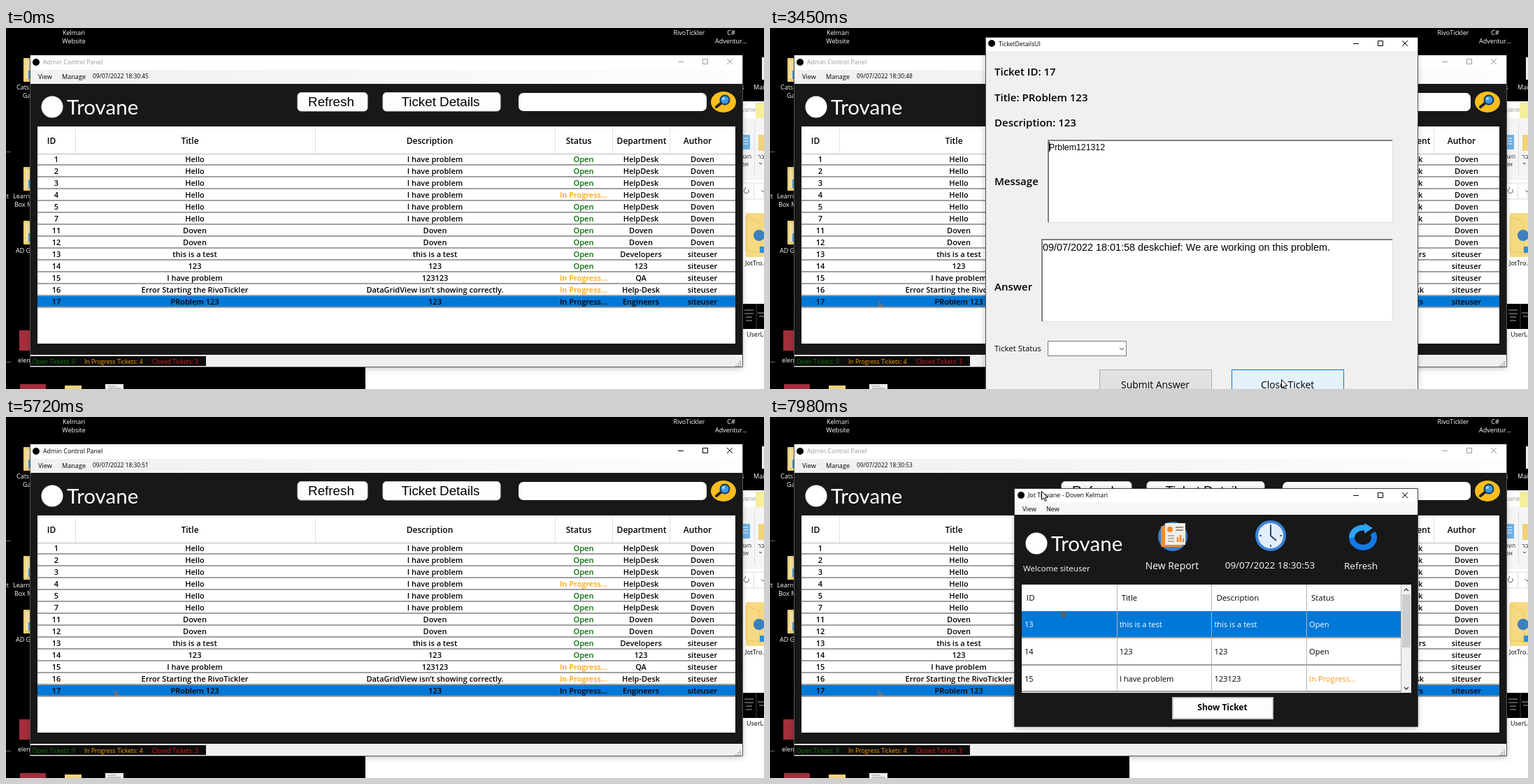
Recreate the animation shown at these times as an HTML page. Size 1084 by 517 pixels, loop 8 s.

```html
<!DOCTYPE html>
<html lang="en">
<head>
<meta charset="utf-8">
<title>Ticket desk</title>
<style>
html, body { margin: 0; width: 100%; height: 100%; overflow: hidden; background: #000; }
svg { display: block; font-family: "Open Sans", "Noto Sans", sans-serif; }
.arial { font-family: "Liberation Sans", Arial, sans-serif; }
.logo { font-family: Lato, sans-serif; }
.medium { font-weight: 500; }
.semi { font-weight: 600; }
.bold { font-weight: 700; }
.mid { text-anchor: middle; }
.frame { filter: drop-shadow(0 2px 4px rgba(0, 0, 0, .28)); }
.pop { transform-box: fill-box; transform-origin: center; }
</style>
</head>
<body>
<svg id="stage" width="1084" height="517" viewBox="0 0 1084 517"></svg>
<script>
const DARK = '#181818', BLUE = '#0078d7', ORANGE = '#ffa500', GREEN = '#006e00';
const text = (s, x, y, size, fill = '#000', cls = '', more = '') =>
  `<text x="${x}" y="${y}" font-size="${size}" fill="${fill}" class="${cls}" ${more}>${s}</text>`;
const rect = (x, y, x2, y2, fill, more = '') =>
  `<rect x="${x}" y="${y}" width="${x2 - x}" height="${y2 - y}" fill="${fill}" ${more}/>`;
const disc = (x, y, r, fill, more = '') => `<circle cx="${x}" cy="${y}" r="${r}" fill="${fill}" ${more}/>`;
const line = (d, stroke, width = 1, more = '') =>
  `<path d="${d}" fill="none" stroke="${stroke}" stroke-width="${width}" ${more}/>`;
const controls = (x, y, color) => line(
  `M${x} ${y + .5}h8M${x + 35.5} ${y - 3.5}h7v7h-7zM${x + 70} ${y - 4}l8 8m0-8l-8 8`, color);
const logo = (x, y) => disc(x, y, 15.5, '#fff') + text('Trovane', x + 21, y + 11, 29.5, '#fff', 'logo');

function desktop() {
  const label = (s, x, y) => text(s, x, y, 9, '#fff', 'mid');
  const left = (s, x, y) => text(s, x, y, 9, '#fff');
  const folder = (x, y) => rect(x, y, x + 24, y + 34, '#f3d278', 'rx="1"')
    + rect(x + 3, y + 3, x + 9, y + 30, '#f9e6ac') + rect(x + 7, y + 18, x + 12, y + 30, '#4a9ed6');
  return rect(0, 0, 1084, 517, '#000')
    + label('Kelmari', 97, 10) + label('Website', 97, 22)
    + label('RivoTickler', 977, 10) + label('C#', 1037, 10) + label('Adventur...', 1037, 22)
    + folder(25, 43) + folder(25, 199) + folder(25, 276)
    + left('Cats', 15, 88) + left('Ga', 24, 100) + left('...', 0, 178)
    + left('rt', -3, 244) + left('Learn', 10, 244) + left('Box M', 12, 256)
    + left('AD G', 14, 322) + left('...', 0, 479) + left('elem', 17, 479)
    + rect(19, 433, 40, 462, '#a32f3c') + rect(20, 510, 57, 517, '#a32f3c')
    + rect(84, 512, 108, 517, '#f3d278') + rect(142, 510, 168, 517, '#eee')
    + line('M146 513h12m-12 3h18', '#999')
    + left('s', 1051, 88) + left('Main', 1069, 88) + rect(1081, 42, 1084, 74, '#eee')
    // file explorer
    + rect(514, 105, 1084, 517, '#fff')
    + text('vane', 1052, 120, 9, '#999') + rect(1072, 107, 1084, 129, '#f5ee9a')
    + rect(1053, 129, 1084, 218, '#f4f5f6') + line('M1070.5 135v76', '#ddd')
    + rect(1052, 153, 1064, 174, '#6fb1e4') + line('M1054 158h7m-7 4h7m-7 4h7', '#fff')
    + rect(1076, 153, 1084, 176, '#f3d278')
    + text('העת', 1050, 187, 8.5, '#333') + text('אס', 1051, 198, 8.5, '#333') + text('בר', 1075, 187, 8.5, '#333')
    + line('M1077 193l2 2 2-2', '#333')
    + rect(1053, 222, 1084, 245, '#fff', 'stroke="#ddd"')
    + line('M1061.5 231a3.5 3.5 0 1 1-4-1v-2', '#555') + line('M1069.5 222v23', '#ddd')
    + line('M1080 232l3 3 3-3', '#555')
    + rect(1058, 265, 1084, 328, '#f6d981', 'rx="2"') + line('M1058 270l20 8v44l-20-3z', '#efc75c')
    + disc(1077, 297, 8, '#3a7fc0') + rect(1078, 313, 1084, 322, '#2c8fd6')
    + text('JotTro...', 1057, 340, 9)
    + rect(1053, 395, 1084, 431, '#000') + line('M1073 395v36', '#444')
    + line('M1056 404h13m-13 5h13m-11 5h9m-9 5h9m8-11h9m-7 5h7', '#aaa')
    + text('UserLo...', 1059, 442, 9);
}

const tickets = `1|Hello|I have problem|Open|HelpDesk|Doven
2|Hello|I have problem|Open|HelpDesk|Doven
3|Hello|I have problem|Open|HelpDesk|Doven
4|Hello|I have problem|In Progress...|HelpDesk|Doven
5|Hello|I have problem|Open|HelpDesk|Doven
7|Hello|I have problem|Open|HelpDesk|Doven
11|Doven|Doven|Open|Doven|Doven
12|Doven|Doven|Open|Doven|Doven
13|this is a test|this is a test|Open|Developers|siteuser
14|123|123|Open|123|siteuser
15|I have problem|123123|In Progress...|QA|siteuser
16|Error Starting the RivoTickler|DataGridView isn’t showing correctly.|In Progress...|Help-Desk|siteuser
17|PRoblem 123|123|In Progress...|Engineers|siteuser`.split('\n').map(r => r.split('|'));

function ticketGrid() {
  const cellX = [72, 270, 613.5, 826, 908, 996], headX = [65, 263, 606, 819, 909, 989];
  let s = rect(45, 141, 1043, 452, '#fff') + line('M45 180.5h998', '#bbb')
    + line('M99.5 141v39m343-39v39m343-39v39m82-39v39m82-39v39', '#e2e2e2');
  ['ID', 'Title', 'Description', 'Status', 'Department', 'Author']
    .forEach((h, i) => s += text(h, headX[i], 166, 12, '#000', 'semi mid'));
  tickets.forEach((row, i) => {
    const y = 180 + 17 * i, chosen = i == 12;
    if (chosen) s += rect(45, y, 1043, y + 15, BLUE);
    s += rect(45, y + 15, 1043, y + 17, '#a0a0a0');
    row.forEach((c, k) => s += text(c, cellX[k], y + 12, 11,
      k == 3 && !chosen ? (c == 'Open' ? GREEN : ORANGE) : '#000', 'semi mid'));
  });
  return s;
}

function mainWindow() {
  const button = (x, x2, s, cx) => rect(x, 92.5, x2, 119, '#fdfdfd', 'rx="5" stroke="#d5d5d5"')
    + text(s, cx, 112, 18.8, '#000', 'arial mid');
  return rect(35, 39, 1053, 485, '#f0f0f0', 'class="frame"')
    + rect(35, 39, 1053, 60, '#fff') + rect(35, 60, 1053, 80, 'url(#menu)')
    + disc(43, 49, 5, '#000')
    + `<g id="caption">${text('Admin Control Panel', 53, 52, 8.9, 'currentColor') + controls(961, 48, 'currentColor')}</g>`
    + text('View', 46, 73, 9.1) + text('Manage', 80, 73, 9.1) + text('', 124, 72, 8.4, '#000', 'clock')
    + rect(35, 80, 1053, 468, DARK) + logo(66, 113)
    + line('M34.5 39v446.500H1053.500V39', '#555')
    + button(417, 517, 'Refresh', 465) + button(539, 707, 'Ticket Details', 621.5)
    + rect(733, 93, 1002, 119, '#fff', 'rx="7"')
    + '<ellipse cx="1026" cy="106" rx="18" ry="15" fill="#fdbe1c"/>'
    + line('M1022 108l-6 5', '#222', 4, 'stroke-linecap="round"')
    + disc(1028, 103, 6.5, '#3d9be0', 'stroke="#123a66" stroke-width="2"') + disc(1026, 101, 2, '#a8d8f8')
    + ticketGrid()
    + '<path id="speck" d="M155 390l8 9h-8z" fill="#6b7076"/>'
    + rect(35, 470, 286, 484, '#0c0c0c')
    + text('Open Tickets: 9', 38, 481, 8.6, '#0a7a0a') + text('In Progress Tickets: 4', 112, 481, 8.6, ORANGE)
    + text('Closed Tickets: 3', 209, 481, 8.6, '#e01b1b')
    + line('M1049 478h2m-5 3h2m1 0h2m-8 3h2m1 0h2m1 0h2', '#aaa', 2);
}

function detailsWindow() {
  const sunken = (x, y, x2, y2) => rect(x, y, x2, y2, '#fff')
    + line(`M${x + 1} ${y2}V${y + 1}H${x2}`, '#808080', 2) + line(`M${x} ${y2 - .5}H${x2 - .5}V${y}`, '#ddd');
  const head = (s, y) => text(s, 321, y, 15, '#000', 'semi');
  const button = (x, s, id) => rect(x + .5, 489.5, x + 160.5, 530, '#e1e1e1', `id="${id}" stroke="#adadad"`)
    + text(s, x + 80, 516, 13.9, '#000', 'mid');
  return rect(308, 13, 926, 540, '#f0f0f0', 'class="frame"') + rect(308, 13, 926, 33, '#fff')
    + line('M308.5 540V13.5H926.5V540', '#555') + disc(317, 22, 5, '#000')
    + text('TicketDetailsUI', 327, 26, 8.7) + controls(834, 22, '#000')
    + head('Ticket ID: 17', 68) + head('Title: PRoblem 123', 105) + head('Description: 123', 141)
    + head('Message', 225) + head('Answer', 376)
    + sunken(397, 160, 891, 279) + text('Prblem121312', 399, 175, 12.3, '#000', 'arial')
    + line('M399.5 163v14', '#000', 1, 'id="caret"')
    + sunken(388, 302, 891, 421)
    + text('09/07/2022 18:01:58 deskchief: We are working on this problem.', 390, 319, 14.4, '#000', 'arial')
    + text('Ticket Status', 321, 463, 11.4)
    + rect(397.5, 448.5, 509.5, 469.5, '#fff', 'stroke="#7a7a7a"') + line('M500 458l3 3 3-3', '#444')
    + button(471, 'Submit Answer', 'submit') + button(660, 'Close Ticket', 'close');
}

function userWindow() {
  const label = (s, x, y, size, cls = '') => text(s, x, y, size, '#fff', 'mid ' + cls);
  const blanks = [[359, 159, 517, 204], [359, 209, 463, 225], [521, 145, 631, 225], [694, 149, 738, 190],
    [647, 204, 784, 222], [791, 145, 901, 225], [359, 239, 917, 396], [574, 400, 721, 433]];
  let grid = rect(360, 240, 917, 395, '#fff') + rect(360, 278, 903, 316, BLUE)
    + line('M496.5 240v153m135-153v153m136-153v153m135-153v153', '#b5b5b5')
    + [315, 354, 392].map(y => rect(360, y, 903, y + 2, '#a0a0a0')).join('')
    + rect(903, 240, 917, 395, '#f0f0f0') + rect(904, 254, 916, 330, '#cdcdcd')
    + line('M907 249l3-3 3 3M907 387l3 3 3-3', '#444', 1.5);
  ['ID', 'Title', 'Description', 'Status'].forEach((h, i) => grid += text(h, 367 + 135.7 * i, 263, 11.4));
  tickets.slice(8, 11).forEach((row, i) => row.slice(0, 4).forEach((c, k) =>
    grid += text(c, 364 + 135.7 * k, 301 + 39 * i, 11.1,
      i == 0 ? '#fff' : k == 3 && i == 2 ? '#f59a1b' : '#000', 'medium')));
  const icons = disc(576, 171, 21, '#3f7fc4')
    + rect(559, 156, 589, 186, '#f28b2a', 'rx="2"') + rect(565, 152, 594, 183, '#f3ede4')
    + disc(572, 161, 4, '#f28b2a') + line('M580 158h11m-11 4h11', '#777', 1.5)
    + line('M569 170h9m-9 4h9m-9 4h9', '#999', 1.5) + line('M583 179v-7m4 7v-10m4 10v-5', '#f28b2a', 2.5)
    + disc(716, 170, 20, '#e3eefa', 'stroke="#3b82d6" stroke-width="4"')
    + line('M716 154v3m0 26v3m-16-16h3m26 0h3', '#3b5f8c', 2) + line('M716 157v13l8 7', '#26466e', 2)
    + line('M832 173a16 14 0 0 1 20-14', '#2ea3f7', 8) + line('M862 166a16 14 0 1 1-30 7', '#1479e6', 8)
    + '<path d="M850 152l12 7-12 8z" fill="#2ea3f7"/>';
  return rect(350, 102, 926, 443, DARK, 'class="frame"') + rect(350, 102, 926, 122, '#fff')
    + line('M349.5 102.5h577v341h-577z', '#444') + disc(359, 112, 5, '#000')
    + text('Jot Trovane - Doven Kelmari', 369, 115, 8.9) + controls(834, 112, '#000')
    + `<g id="blanks">${blanks.map(b => rect(...b, '#000')).join('')}</g><g id="content">`
    + rect(350, 122, 926, 140, '#f7f7f7') + text('View', 361, 135, 9.1) + text('New', 395, 135, 9.1)
    + logo(381, 181) + text('Welcome siteuser', 362, 221, 11.6, '#fff') + icons
    + label('New Report', 575, 218, 13.9) + label('', 715, 217, 13.5, 'clock') + label('Refresh', 845, 218, 13.5)
    + grid + '<path id="smudge" d="M415 279h9v7l-4 2-5-3z" fill="#4d6478"/>'
    + rect(576, 402, 719, 432, '#fdfdfd', 'stroke="#c8c8c8" stroke-width="2"')
    + text('Show Ticket', 647, 420, 12, '#000', 'bold mid') + '</g>';
}

const $ = id => document.getElementById(id);
$('stage').innerHTML = '<defs><linearGradient id="menu"><stop stop-color="#f0f0f0"/><stop offset="1" stop-color="#fdfdfd"/></linearGradient></defs>'
  + desktop() + mainWindow()
  + `<g id="details" class="pop">${detailsWindow()}</g><g id="user" class="pop">${userWindow()}</g>`
  + '<path id="cursor" d="M.5 .5v12l2.8-2.6 2 4.4 2-.9-2-4.2h3.7z" fill="#fff" stroke="#000"/>';
const clocks = document.querySelectorAll('.clock');

const ticks = [450, 1350, 2450, 3500, 4500, 5520, 6400, 7370];
// pointer path: time, x, y
const path = [[110, 645, 517], [480, 155, 390], [810, 281, 398], [1620, 281, 398], [2250, 667, 470],
  [2400, 690, 492], [2600, 721, 500], [2820, 721, 500], [3030, 731, 503], [4220, 731, 503],
  [4590, 775, 302], [4660, 775, 295], [5050, 405, 133], [5420, -12, 36], [7560, -12, 330],
  [7561, 100, 330], [7720, 415, 278], [7980, 388, 106], [8000, 388, 106]];

const clamp = v => Math.max(0, Math.min(1, v));
const show = (id, on) => $(id).setAttribute('visibility', on ? 'inherit' : 'hidden');

function pop(id, p) {
  const e = 1 - (1 - clamp(p)) ** 2;
  $(id).style.opacity = e;
  $(id).style.transform = `scale(${.9 + .1 * e})`;
  show(id, e > 0);
}

function draw(now) {
  const t = now % 8000;
  const seconds = 45 + ticks.filter(k => t >= k).length;
  clocks.forEach(c => c.textContent = '09/07/2022 18:30:' + seconds);

  const active = t >= 1050 && t < 1210 || t >= 3830 && t < 6340;
  $('caption').style.color = active ? '#000' : '#999';
  pop('details', t < 3830 ? (t - 1180) / 190 : 1 - (t - 3830) / 180);
  pop('user', (t - 7350) / 120);
  show('blanks', t < 7540);
  show('content', t >= 7540);
  show('speck', t >= 500);
  show('smudge', t >= 7730);
  show('caret', Math.floor((t - 1300) / 530) % 2 == 0);

  const hover = t >= 2400;
  $('close').setAttribute('fill', hover ? '#e5f1fb' : '#e1e1e1');
  $('close').setAttribute('stroke', hover ? BLUE : '#adadad');

  const i = path.findIndex(p => p[0] > t);
  show('cursor', i > 0);
  if (i > 0) {
    const [a, b] = [path[i - 1], path[i]], f = (t - a[0]) / (b[0] - a[0]);
    $('cursor').setAttribute('transform', `translate(${a[1] + (b[1] - a[1]) * f} ${a[2] + (b[2] - a[2]) * f})`);
  }
  requestAnimationFrame(draw);
}
draw(0);
</script>
</body>
</html>
```
